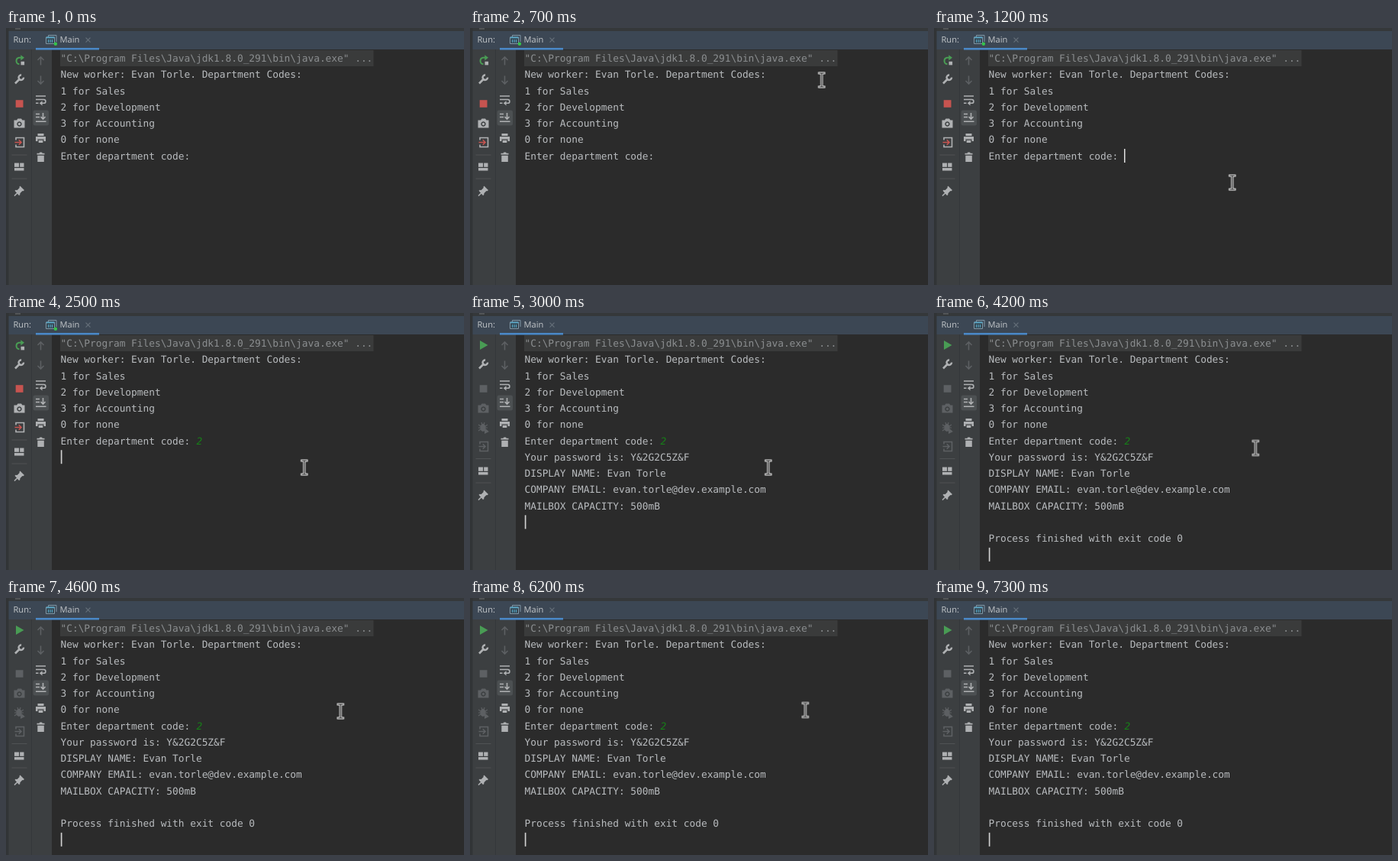
Animation, 600 px wide and 336 px high, one loop 7400 ms. Source, as an HTML page:

```html
<!DOCTYPE html>
<html lang="en">
<head>
<meta charset="utf-8">
<title>Run console</title>
<style>
html, body { margin: 0; width: 100%; height: 100%; overflow: hidden; background: #2b2b2b; }
svg { display: block; width: 600px; height: 336px; }
text { text-rendering: geometricPrecision; white-space: pre; }
.ui { font: 11.1px "Open Sans", "Noto Sans", sans-serif; fill: #c3c7ca; }
.con { font: 12.82px "DejaVu Sans Mono", "Noto Sans Mono", monospace; fill: #b9bcbf; }
.con .cmd { fill: #8b8e90; }
.con .typed { fill: #168017; font-style: italic; }
.line { fill: none; stroke: currentColor; stroke-width: 1.6; }
.solid { fill: currentColor; }
.grey { color: #afb1b3; }
.dim { color: #5d6063; }
.green { color: #499c54; }
.red { color: #c75450; }
.sep { stroke: #505355; }

.anim { animation: 7.4s step-end infinite; }
.typed { animation-name: typed; }
.out { animation-name: out; }
.ended { animation-name: ended; }
.live { animation-name: live; }
.exit { animation-name: exit; }
.caret { animation-name: caret; }
.mouse { animation-name: mouse; }

@keyframes typed { 0% { opacity: 0 } 25.675%, 100% { opacity: 1 } }
@keyframes out { 0% { opacity: 0 } 36.486%, 100% { opacity: 1 } }
@keyframes ended { 0% { opacity: 0 } 37.837%, 100% { opacity: 1 } }
@keyframes live { 0% { opacity: 1 } 37.837%, 100% { opacity: 0 } }
@keyframes exit { 0% { opacity: 0 } 43.243%, 100% { opacity: 1 } }

@keyframes caret {
  0%, 9.459% { opacity: 0; transform: translate(249px, 158px) }
  2.702%, 16.216% { opacity: 1; transform: translate(249px, 158px) }
  22.972% { opacity: 0; transform: translate(249px, 158px) }
  25.675% { opacity: 1; transform: translate(256.8px, 158px) }
  32.432% { opacity: 0; transform: translate(256.8px, 158px) }
  33.783% { opacity: 1; transform: translate(71.8px, 179.2px) }
  36.486% { opacity: 1; transform: translate(71.8px, 264.3px) }
  43.243%, 56.756%, 70.27%, 83.783%, 97.297%, 100% { opacity: 1; transform: translate(71.8px, 306.8px) }
  50%, 63.513%, 77.027%, 90.54% { opacity: 0; transform: translate(71.8px, 306.8px) }
}

@keyframes mouse {
  0% { opacity: 0; transform: translate(479px, 27px) }
  8.108% { opacity: 1; transform: translate(479px, 27px); animation-timing-function: steps(3) }
  12.162% { opacity: 1; transform: translate(424px, 150px); animation-timing-function: steps(3) }
  16.216% { opacity: 1; transform: translate(390.7px, 202px) }
  51.351% { opacity: 1; transform: translate(390.7px, 202px); animation-timing-function: steps(4) }
  56.756% { opacity: 1; transform: translate(421.3px, 176.5px); animation-timing-function: steps(4) }
  62.162% { opacity: 1; transform: translate(438.3px, 148px) }
  63.513% { opacity: 1; transform: translate(439.3px, 146.5px) }
  83.783% { opacity: 1; transform: translate(439.3px, 146.5px); animation-timing-function: steps(2) }
  86.486% { opacity: 1; transform: translate(468px, 132px) }
  87.837%, 100% { opacity: 0; transform: translate(468px, 132px) }
}
</style>
</head>
<body>
<svg viewBox="0 0 600 336">
  <defs>
    <g id="wrench">
      <path class="line" style="stroke-width:2.6" d="M-5.5 5.5 1 -1"/>
      <path class="line" style="stroke-width:2.5" d="M2.6 -5.4A3.2 3.2 0 1 0 5.5 -2.4"/>
    </g>
    <rect id="stop" class="solid" x="-4.8" y="-4.8" width="9.8" height="9.6"/>
    <g id="camera">
      <path class="solid" fill-rule="evenodd" d="M-7-4H-3.5L-2-6H2.5L4-4H7V6H-7ZM0-2.2A3.2 3.2 0 1 0 .01-2.2Z"/>
      <circle class="solid" cy="1" r="1.7"/>
    </g>
    <path id="frame" class="line" d="M-5 -3V-6H5.5V6H-5V3"/>
    <path id="enter" class="line" d="M-6.5 0H2M-1.2 -3.2 2 0 -1.2 3.2"/>
    <path id="layout" class="solid" d="M-6-5H0V.2H-6ZM1.2-5H6.5V.2H1.2ZM-6 1.4H6.5V5H-6Z"/>
    <g id="pin">
      <path class="solid" d="M1-6.5 6.5-1 5 .2 4 0 1 3 .7 5.3-.5 6-6-.2-4.8-1.2-2.8-1 .2-4 0-5.3Z"/>
      <path class="line" d="M-2.2 2.2-6.5 6.5"/>
    </g>
    <path id="arrow" class="line" d="M0 5.5V-5M-4 -1 0 -5 4 -1"/>
    <path id="sep" class="sep" d="M-10 0H10"/>
  </defs>

  <!-- panels -->
  <rect width="600" height="336" fill="#2b2b2b"/>
  <rect width="60" height="336" fill="#3c3f41"/>
  <rect width="600" height="4" fill="#35383a"/>
  <rect x="3" y="4" width="597" height="24" fill="#3c4754"/>
  <rect width="3.5" height="336" fill="#313436"/>
  <path d="M33.5 28V336" stroke="#34373a"/>
  <path d="M12 1H19" stroke="#6e7173"/>

  <!-- header -->
  <text class="ui" x="9.5" y="19.3">Run:</text>
  <rect x="39" y="26" width="83" height="2.6" fill="#4a88c7"/>
  <path d="M55.5 17V9.5H66V18" fill="none" stroke="#7f97a6"/>
  <path d="M52.5 12H63.5V20.5H52.5Z" fill="#34434e" stroke="#7f97a6"/>
  <path d="M53 12.5H63.5" stroke="#56a5c4" stroke-width="1.8"/>
  <path d="M55.5 15V19M58 15V19M60.5 15V19" stroke="#56a5c4" stroke-width="1.2"/>
  <circle class="anim live" cx="64.9" cy="20.7" r="2.2" fill="#35c44c"/>
  <text class="ui" x="70.5" y="19.3">Main</text>
  <path d="M104.5 12.7 110.5 18.7M110.5 12.7 104.5 18.7" stroke="#66717b" stroke-width="1.1"/>

  <!-- run toolbar -->
  <use href="#wrench" class="grey" x="17.5" y="67"/>
  <g class="anim live">
    <g class="green">
      <path class="line" style="stroke-width:2" d="M17.5 47.3A4.3 4.3 0 0 1 17 38.8H20"/>
      <path class="solid" d="M19.3 35.2 24 38.8 19.3 42.4Z"/>
    </g>
    <rect class="grey solid" x="19.5" y="43.8" width="4.6" height="4.6"/>
    <use href="#stop" class="red" x="17.5" y="99"/>
    <use href="#camera" class="grey" x="17.5" y="124.5"/>
    <use href="#frame" class="grey" x="18" y="149.5"/>
    <use href="#enter" class="red" x="18" y="149.5"/>
    <use href="#sep" x="17.5" y="166"/>
    <use href="#layout" class="grey" x="17" y="181.5"/>
    <use href="#sep" x="17.5" y="197"/>
    <use href="#pin" class="grey" x="17.5" y="213"/>
  </g>
  <g class="anim ended">
    <path class="green solid" d="M13 36 23.5 42 13 48Z"/>
    <use href="#stop" class="dim" x="17.5" y="99"/>
    <use href="#camera" class="dim" x="17.5" y="124.5"/>
    <g class="dim">
      <ellipse class="solid" cx="17" cy="150" rx="3.6" ry="5"/>
      <path class="line" style="stroke-width:1.2" d="M11 146 23 154M11 154 23 146M11 150H23M15 143 16 146M19 143 18 146"/>
      <path class="solid" d="M19 151 25 155 19 158Z"/>
    </g>
    <use href="#frame" class="dim" x="18" y="174.5"/>
    <use href="#enter" class="dim" x="18" y="174.5"/>
    <use href="#sep" x="17.5" y="190.5"/>
    <use href="#layout" class="grey" x="17" y="206.5"/>
    <use href="#sep" x="17.5" y="222"/>
    <use href="#pin" class="grey" x="17.5" y="238"/>
  </g>

  <!-- console toolbar -->
  <use href="#arrow" class="dim" x="45.5" y="43"/>
  <use href="#arrow" class="dim" transform="translate(45.5 68) scale(1 -1)"/>
  <rect x="35.5" y="107.5" width="20.5" height="20" rx="2.5" fill="#4c5052"/>
  <g class="grey">
    <path class="line" d="M39 89H52M39 93.5H49.5A2.4 2.4 0 0 1 49.5 98.3H46M39 98.3H42.5"/>
    <path class="solid" d="M47.5 95.2V101.4L43.8 98.3Z"/>
    <path class="line" d="M39 112.5H44M39 116.5H44M39 122.3H52.5M48.5 111V119M45.5 116 48.5 119 51.5 116"/>
    <path class="solid" d="M41.5 138H49.5V141H41.5ZM39 142H52V148H49.5V145.5H41.5V148H39ZM42.7 146.8H48.3V150H42.7Z"/>
    <path class="solid" d="M40.5 163.8H43.5L44.3 162.5H47L47.8 163.8H50.5V165.5H40.5ZM41.3 166.7H49.8V175H41.3Z"/>
  </g>

  <!-- console -->
  <rect x="71" y="29" width="410.5" height="21" fill="#3a3b3b"/>
  <g class="con">
    <text class="cmd" x="71.5" y="44">"C:\Program Files\Java\jdk1.8.0_291\bin\java.exe" ...</text>
    <text x="71.5" y="65.2">New worker: Evan Torle. Department Codes:</text>
    <text x="71.5" y="86.5">1 for Sales</text>
    <text x="71.5" y="107.7">2 for Development</text>
    <text x="71.5" y="129">3 for Accounting</text>
    <text x="71.5" y="150.2">0 for none</text>
    <text x="71.5" y="171.5">Enter department code:</text>
    <text class="anim typed" x="249.4" y="171.5">2</text>
    <g class="anim out">
      <text x="71.5" y="192.7">Your password is: Y&amp;2G2C5Z&amp;F</text>
      <text x="71.5" y="214">DISPLAY NAME: Evan Torle</text>
      <text x="71.5" y="235.2">COMPANY EMAIL: evan.torle@dev.example.com</text>
      <text x="71.5" y="256.5">MAILBOX CAPACITY: 500mB</text>
    </g>
    <text class="anim exit" x="71.5" y="299">Process finished with exit code 0</text>
  </g>
  <rect class="anim caret" width="1.5" height="18" fill="#e2e2e2"/>

  <g class="anim mouse" fill="none">
    <path d="M-4.6 -9H4.6M-4.6 9H4.6M0 -9V9" stroke="#f4f4f4" stroke-width="3.2"/>
    <path d="M-3.6 -9H3.6M-3.6 9H3.6M0 -9V9" stroke="#1c1c1c" stroke-width="1.2"/>
  </g>
</svg>
</body>
</html>
```
